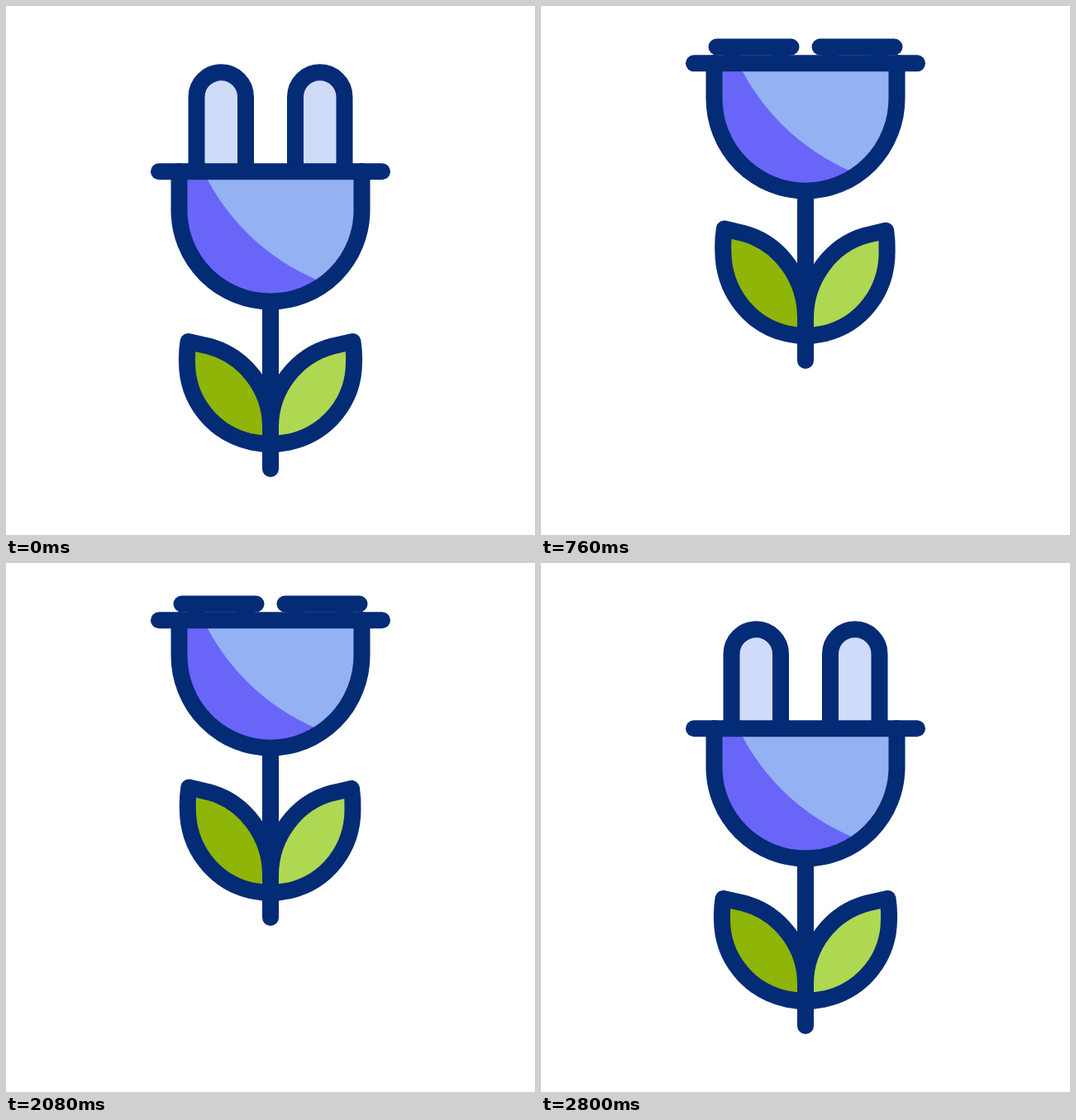
These frames come from a looping animation (640x640 px, 3 s). An HTML page:

```html
<!DOCTYPE html>
<html lang="en">
<head>
<meta charset="utf-8">
<title>Plug flower</title>
<style>
html, body { margin: 0; width: 100%; height: 100%; overflow: hidden; background: #fff; }
svg { display: block; width: 100vw; height: 100vh; }
.line { fill: none; stroke: #042b76; stroke-width: 20; stroke-linecap: round; stroke-linejoin: round; }
.bolt { fill: none; stroke: #fdca50; stroke-width: 20; stroke-linecap: round; stroke-linejoin: round; }
</style>
</head>
<body>
<svg viewBox="0 0 640 640">
  <defs>
    <clipPath id="below"><rect y="49" width="640" height="591"/></clipPath>
    <clipPath id="cup"><path id="cupClip"/></clipPath>
  </defs>
  <g id="bolts"></g>
  <g clip-path="url(#below)">
    <g id="plant">
      <path id="leafL" class="line" style="fill:#8fb508"/>
      <path id="leafR" class="line" style="fill:#aed852"/>
      <path class="line" d="M320 358V560"/>
      <path class="line" style="fill:#d0dbfa" d="M230.5 200V110a29.75 29.75 0 0 1 59.5 0V200"/>
      <path class="line" style="fill:#d0dbfa" d="M350 200V110a29.75 29.75 0 0 1 59.5 0V200"/>
      <g clip-path="url(#cup)">
        <rect x="200" y="200" width="240" height="170" fill="#6965f8"/>
        <circle cx="482" cy="83" r="270" fill="#93b1f3"/>
      </g>
      <path id="cupLine" class="line"/>
      <path class="line" d="M185 200.3H455"/>
    </g>
  </g>
  <path id="slotL" class="line"/>
  <path id="slotR" class="line"/>
</svg>
<script>
const LOOP = 3000, STEP = 40;
const el = id => document.getElementById(id);
const clamp = x => Math.min(1, Math.max(0, x));
const ease = x => 0.5 - 0.5 * Math.cos(Math.PI * clamp(x));

// Eased value through [time, value] keys
function track(t, keys) {
  let [t0, v0] = keys[0];
  for (const [t1, v1] of keys) {
    if (t < t1) return t1 > t0 ? v0 + (v1 - v0) * ease((t - t0) / (t1 - t0)) : v0;
    t0 = t1;
    v0 = v1;
  }
  return v0;
}

const BODY = [[40, 0], [400, 18], [763, -131], [2120, -131], [2592, 18], [2800, 0]];
const SQUASH = [[400, 0], [600, 11.5], [840, 0], [1960, 0], [2320, 11.5], [2592, 0]];
const SLOT = [[160, 0], [400, 1], [2440, 1], [2680, 0]];
const PULSES = [760, 1000];

// Leaf scale: rest, droop, closed, rest, closed, droop, rest
const leafKeys = (droop, closed) => [[40, 1], [400, droop], [600, closed], [880, 1],
  [1960, 1], [2320, closed], [2592, droop], [2800, 1]];
const LEAVES = [
  { node: el('leafL'), side: -1, sx: leafKeys(1.063, 0.967), sy: leafKeys(0.928, 1.112) },
  { node: el('leafR'), side: 1, sx: leafKeys(1.065, 0.94), sy: leafKeys(0.884, 1.068) }
];

// Leaf outline relative to its foot on the stem
function leafPath(side, sx, sy) {
  const p = (x, y) => (320 + side * x * sx).toFixed(2) + ' ' + (531 - y * sy).toFixed(2);
  return `M${p(0, 0)}L${p(0, 22)}C${p(0, 67)} ${p(31, 108)} ${p(75, 119.5)}` +
    `L${p(99.5, 125)}Q${p(101.5, 112)} ${p(101, 100)}C${p(101, 54)} ${p(70, 14)} ${p(23, 3.5)}Z`;
}

// Ellipse whose shoulders rise faster than its bottom
function cupPath(squash) {
  const side = 247 - 1.5 * squash, ry = 110.5 + 0.5 * squash;
  return `M209.5 200V${side}a110.5 ${ry} 0 0 0 221 0V200`;
}

const BOLTS = [
  'M192.5 392L172 434L127.5 435.5L107 490',
  'M446.5 392L467 434L511.5 435.5L532 490',
  'M315 475L305 528L340 549L323 604'
];
const sparks = [];
for (const d of BOLTS) for (const start of PULSES) {
  const node = document.createElementNS('http://www.w3.org/2000/svg', 'path');
  node.setAttribute('class', 'bolt');
  node.setAttribute('d', d);
  node.setAttribute('pathLength', 1);
  el('bolts').appendChild(node);
  sparks.push({ node, start });
}

function drawSpark({ node, start }, t) {
  const age = t - start;
  const head = ease(age / 280), tail = ease((age - 40) / 440);
  const len = head - tail;
  node.style.display = len > 0.001 ? '' : 'none';
  node.setAttribute('stroke-dasharray', `${Math.max(len, 0.001)} 2`);
  node.setAttribute('stroke-dashoffset', -tail);
}

function drawSlot(node, mid, grow) {
  node.style.display = grow > 0 ? '' : 'none';
  node.setAttribute('d', `M${mid - 45 * grow} 49.5H${mid + 45 * grow}`);
}

function draw(t) {
  el('plant').setAttribute('transform', `translate(0 ${track(t, BODY)})`);

  const cup = cupPath(track(t, SQUASH));
  el('cupLine').setAttribute('d', cup);
  el('cupClip').setAttribute('d', cup);

  for (const { node, side, sx, sy } of LEAVES)
    node.setAttribute('d', leafPath(side, track(t, sx), track(t, sy)));

  const grow = track(t, SLOT);
  drawSlot(el('slotL'), 257.5, grow);
  drawSlot(el('slotR'), 382.5, grow);

  for (const s of sparks) drawSpark(s, t);
}

const origin = performance.now();
function frame() {
  const t = (performance.now() - origin) % LOOP;
  draw(Math.floor(t / STEP) * STEP);
  requestAnimationFrame(frame);
}
frame();
</script>
</body>
</html>
```
